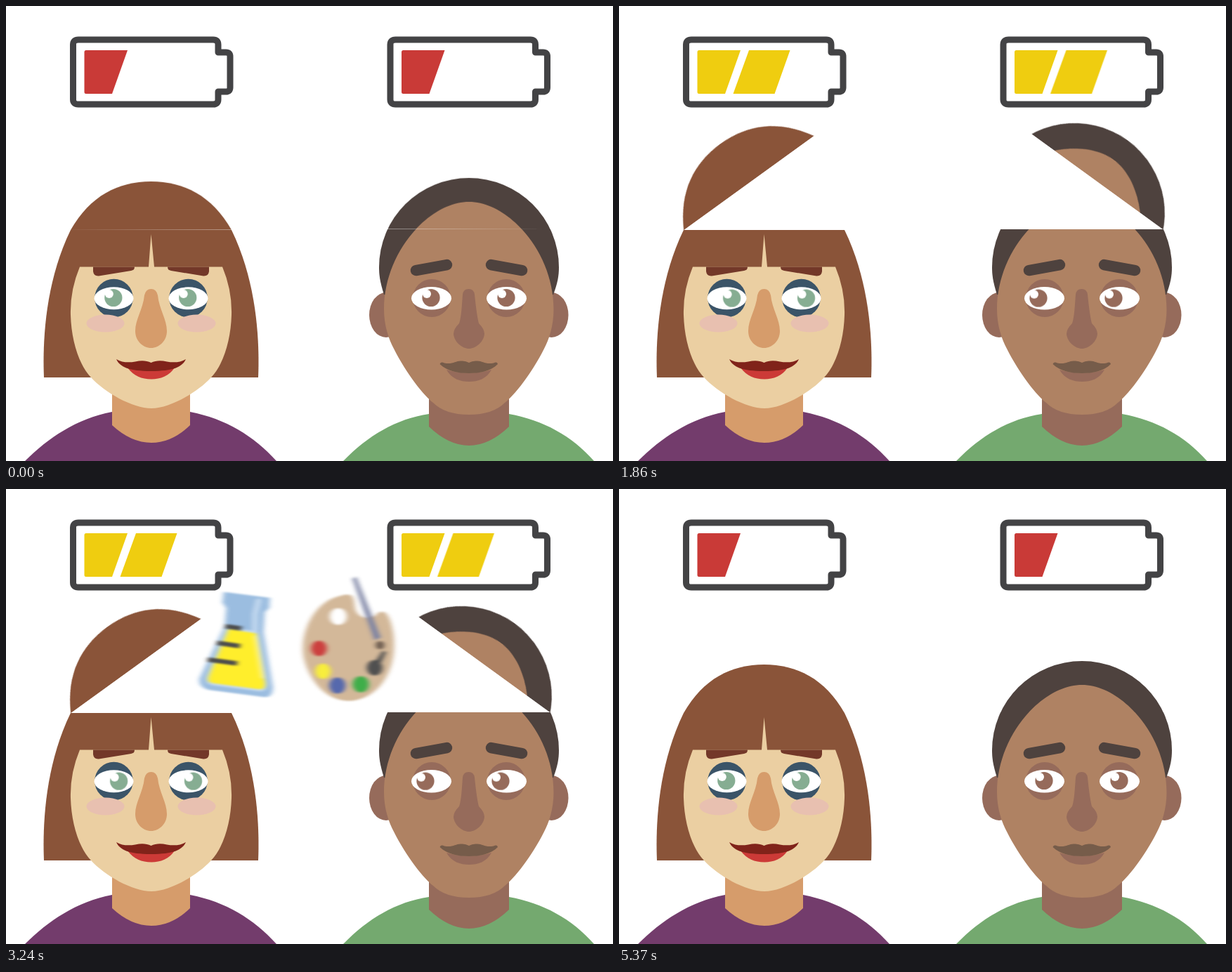
An HTML page for the animation above (5970 ms loop, 864 px wide and 648 px high).

```html
<!DOCTYPE html>
<html lang="en">
<head>
<meta charset="utf-8">
<title>Sharing ideas</title>
<style>
html, body { margin: 0; width: 100%; height: 100%; overflow: hidden; background: #fff; }
svg { display: block; width: 100vw; height: 100vh; }

.cap, .gaze, .charge, .c2, .c3, .x, .y, .spin { animation: 5970ms linear infinite both; }

/* heads and eyes */
.cap { animation-name: open; transform-origin: var(--hinge); }
.gaze { animation-name: look; }
.her { --hinge: 92.5px 319px; --tilt: -35.9deg; --look: 7.8px; }
.him { --hinge: 774px 318px; --tilt: 36deg; --look: -8px; }
@keyframes open {
  0% { transform: rotate(0deg); animation-timing-function: cubic-bezier(.17,.17,.67,1); }
  11.558% { transform: rotate(var(--tilt)); }
  61.307% { transform: rotate(var(--tilt)); animation-timing-function: cubic-bezier(.33,0,.8,.87); }
  73.869%, 100% { transform: rotate(0deg); }
}
@keyframes look {
  0% { transform: translate(0, 0); animation-timing-function: cubic-bezier(.17,.17,.67,1); }
  11.558% { transform: translate(var(--look), .6px); }
  61.307% { transform: translate(var(--look), .6px); animation-timing-function: cubic-bezier(.33,0,.8,.87); }
  73.869%, 100% { transform: translate(0, 0); }
}

/* batteries */
.charge, .c2, .c3 { animation-timing-function: step-end; }
.charge { animation-name: charge; }
.c2 { animation-name: second; }
.c3 { animation-name: third; }
@keyframes charge {
  0% { fill: #c93a37; }
  31.156% { fill: #efcd10; }
  61.307% { fill: #34ad3a; }
  80.905% { fill: #efcd10; }
  89.95%, 100% { fill: #c93a37; }
}
@keyframes second {
  0% { opacity: 0; }
  31.156% { opacity: 1; }
  89.95%, 100% { opacity: 0; }
}
@keyframes third {
  0% { opacity: 0; }
  61.307% { opacity: 1; }
  80.905%, 100% { opacity: 0; }
}

/* ideas: steady sideways, parabolic up and down, slow turn */
.x, .y, .spin { animation-delay: var(--at); }
.x { animation-name: var(--path); }
.y { animation-name: arc; filter: url(#smear); }
.spin { animation-name: turn; }
.left { --path: toLeft; --top: 198px; --low: 425px; --turn: 20deg; }
.right { --path: toRight; --top: 200px; --low: 460px; --turn: -20deg; }
@keyframes toLeft {
  0% { transform: translateX(712px); }
  19.095%, 100% { transform: translateX(152px); }
}
@keyframes toRight {
  0% { transform: translateX(147px); }
  9.548% { transform: translateX(410px); }
  19.095%, 100% { transform: translateX(700px); }
}
@keyframes arc {
  0% { transform: translateY(var(--low)); animation-timing-function: cubic-bezier(.333,.667,.667,1); }
  9.548% { transform: translateY(var(--top)); animation-timing-function: cubic-bezier(.333,0,.667,.333); }
  19.095%, 100% { transform: translateY(var(--low)); }
}
@keyframes turn {
  0% { transform: rotate(calc(-1 * var(--turn))); }
  19.095%, 100% { transform: rotate(var(--turn)); }
}
</style>
</head>
<body>
<svg viewBox="0 0 864 648">
  <defs>
    <filter id="smear" x="-20%" y="-20%" width="140%" height="140%" color-interpolation-filters="sRGB">
      <feGaussianBlur stdDeviation="3.6 .9"/>
    </filter>
    <clipPath id="air"><rect width="864" height="318"/></clipPath>
    <clipPath id="herTop"><rect width="432" height="319"/></clipPath>
    <clipPath id="herLow"><rect y="319" width="432" height="329"/></clipPath>
    <clipPath id="himTop"><rect x="432" width="432" height="318"/></clipPath>
    <clipPath id="himLow"><rect x="432" y="318" width="432" height="330"/></clipPath>

    <path id="case" fill="none" stroke="#434345" stroke-width="9" stroke-linejoin="round"
      d="M103 48H295Q302 48 302 55V66H313Q319 66 319 72V116Q319 122 313 122H302V133Q302 140 295 140H103Q95.5 140 95.5 133V55Q95.5 48 103 48Z"/>
    <path id="cell1" d="M114 63H173L151 125H114Q111.500 125 111.500 122.500V65.500Q111.500 63 114 63Z"/>
    <path id="cell2" d="M185 63H243.500L221.500 125H162.500Z"/>
    <path id="cell3" d="M255.500 63H286Q288 63 288 65V81H302Q304 81 304 83V105.500Q304 107.500 302 107.500H288V123Q288 125 286 125H233Z"/>

    <path id="hair" fill="#8a5439"
      d="M54 529C52 480 55 395 92 319C120 270 160 250 206.500 250C253 250 293 270 321 319C358 395 361 480 359 529Z"/>
    <g id="himHead">
      <path fill="#4e423e" d="M538 411C532 392 531 382 531 372A128 127 0 0 1 787 372C787 385 785 395 779 411Z"/>
      <path fill="#af8263" d="M659 279C603 279 538 350 538 432C538 455 545 475 552 488C570 524 595 555 608 565Q625 582 659 582Q693 582 710 565C723 555 748 524 766 488C773 475 779.500 455 779.500 432C779.500 350 715 279 659 279Z"/>
    </g>
    <g id="herSide">
      <path fill="#733829" d="M124 371.500V378Q125 385 132 384.500L178 377Q183 376 183 371.500Z"/>
      <circle cx="153.500" cy="416" r="27.300" fill="#3b5468"/>
      <ellipse cx="153.500" cy="416.300" rx="28" ry="16" fill="#fff"/>
      <ellipse cx="141.500" cy="452" rx="27" ry="12.500" fill="#e8c0b0"/>
    </g>
    <g id="himSide">
      <path stroke="#4e423e" stroke-width="15.500" stroke-linecap="round" d="M583.500 376.500L627.500 368.500"/>
      <circle cx="606" cy="416" r="27" fill="#966b5b"/>
      <ellipse cx="605.500" cy="416.300" rx="28.500" ry="16.300" fill="#fff"/>
    </g>
    <g id="iris">
      <circle r="12.600"/>
      <circle cx="-6" cy="-5.500" r="6" fill="#fff"/>
    </g>
  </defs>

  <rect width="864" height="648" fill="#fff"/>

  <!-- batteries -->
  <g>
    <use href="#case"/>
    <g class="charge"><use href="#cell1"/><use href="#cell2" class="c2"/><use href="#cell3" class="c3"/></g>
  </g>
  <g transform="translate(451.500 0)">
    <use href="#case"/>
    <g class="charge"><use href="#cell1"/><use href="#cell2" class="c2"/><use href="#cell3" class="c3"/></g>
  </g>

  <!-- woman -->
  <g class="her">
    <path fill="#733c6c" d="M27 648C60 615 100 588 151 578H262C313 588 352 612 385 648Z"/>
    <path fill="#d69c6b" d="M151 540V597Q178 622 207 622Q236 622 262 597V540Z"/>
    <g clip-path="url(#herLow)"><use href="#hair"/></g>
    <path fill="#ebcfa2" d="M105 371.500Q91 405 92 440C93 475 103 510 121 529C140 550 180 573 207 573C233 573 273 550 292 529C310 510 320 475 321 440Q322 405 308 371.500H211L206.500 325L203 371.500Z"/>
    <use href="#herSide"/>
    <use href="#herSide" transform="matrix(-1 0 0 1 413 0)"/>
    <g class="gaze" fill="#86ad92">
      <use href="#iris" x="152.800" y="415.500"/>
      <use href="#iris" x="258.700" y="415.500"/>
    </g>
    <path fill="#d69c6b" d="M197 412Q199 403 206.500 403Q214 403 216 412C218 432 229 446 229 463C229 477 218 487 206.500 487C195 487 184 477 184 463C184 446 195 432 197 412Z"/>
    <path fill="#cc3a37" d="M173 515C190 520 223 520 240 515C232 527 220 531.500 207 531.500C193 531.500 182 527 173 515Z"/>
    <path fill="#80231a" d="M157 503C165 508 175 508 184 506.500C193 504.500 200 505 206.500 508C213 505 220 504.500 229 506.500C238 508 248 508 256 503C251 514 238 520 206.500 520C175 520 162 514 157 503Z"/>
    <g class="cap"><g clip-path="url(#herTop)"><use href="#hair"/></g></g>
  </g>

  <!-- man -->
  <g class="him">
    <path fill="#74a96f" d="M480 648C515 612 555 588 602 581H716C765 590 805 612 837 648Z"/>
    <path fill="#966b5b" d="M602 550V599Q630 626 659 626Q688 626 716 599V550Z"/>
    <g fill="#966b5b">
      <ellipse cx="541" cy="440" rx="24" ry="32"/>
      <ellipse cx="776.500" cy="440" rx="24" ry="32"/>
    </g>
    <g clip-path="url(#himLow)"><use href="#himHead"/></g>
    <use href="#himSide"/>
    <use href="#himSide" transform="matrix(-1 0 0 1 1318 0)"/>
    <g class="gaze" fill="#966b5b">
      <use href="#iris" x="605" y="415.500"/>
      <use href="#iris" x="712" y="415.500"/>
    </g>
    <path fill="#966b5b" d="M650 411Q651 403 658.500 403Q666 403 667 411C669 430 671 445 673 452Q681 460 681 467C680 479 668 488 659 488C650 488 638 479 637 467Q637 460 645 452C648 445 649 425 650 411Z"/>
    <path fill="#966b5b" d="M627 518C645 524 673 524 691 518C684 531 672 535 659 535C647 535 634 531 627 518Z"/>
    <path fill="#765c4a" d="M617.500 510Q619 506 624 508.500C636 511 640 505 648 505.500Q654 505 659 508Q664 505 670 505.500C678 505 682 511 694 508.500Q699 506 700 510C690 520 675 523 659 523C643 523 628 520 617.500 510Z"/>
    <g class="cap"><g clip-path="url(#himTop)"><use href="#himHead"/></g></g>
  </g>

  <!-- ideas in flight -->
  <g clip-path="url(#air)">
    <g class="right" style="--at: 720ms"><g class="x"><g class="y"><g class="spin">
      <g transform="rotate(-2.100) translate(-382 -203)">
        <path fill="#954b46" d="M310 191Q312 180 322 178L445 147L490 207L486 227L356 262Z"/>
        <path fill="#efe0b5" d="M322 180L364 240L359 256L316 194Q316 184 322 180Z"/>
        <path fill="#cbb88a" d="M364 240L482 208L480 223L359 256Z"/>
        <path fill="#954b46" d="M322 178L445 147L486 206L364 240Z"/>
        <path fill="#b98080" d="M411 177L440 168L460 195L430 204Z"/>
      </g>
    </g></g></g></g>

    <g class="left" style="--at: 676ms"><g class="x"><g class="y"><g class="spin">
      <g transform="rotate(.6) translate(-440 -198)" fill="#505050">
        <path d="M387 160L472 128L476 153L391 183Z"/>
        <path d="M387 160L395 159L413 252L405 254ZM465 131L472 128L492 220L484 224Z"/>
        <ellipse cx="394" cy="257" rx="20" ry="19"/>
        <ellipse cx="469.500" cy="226" rx="20" ry="19"/>
      </g>
    </g></g></g></g>

    <g class="right" style="--at: 2505ms"><g class="x"><g class="y"><g class="spin">
      <g transform="rotate(-5.800) translate(-334 -222)">
        <path fill="#d3b899" d="M326 150C350 147 348 155 347 170C346 185 365 195 376 185C390 178 394 195 393 217C390 265 360 300 320 300C285 298 262 265 261 225C262 190 290 152 326 150Z"/>
        <circle cx="321" cy="178" r="12" fill="#fff"/>
        <circle cx="285" cy="217" r="11" fill="#cc403f"/>
        <circle cx="284" cy="250" r="11" fill="#f8ee3d"/>
        <circle cx="300" cy="274" r="11.500" fill="#5669ad"/>
        <circle cx="333" cy="279" r="11.500" fill="#3fae49"/>
        <circle cx="357" cy="260" r="11" fill="#505050"/>
        <path fill="#505050" d="M374 238L377 242L362 262L355 256Z"/>
        <circle cx="371" cy="230" r="6" fill="#6e5d50"/>
        <path fill="#7b82a3" d="M352 130L357 127L374 219L365 222Z"/>
      </g>
    </g></g></g></g>

    <g class="left" style="--at: 2482ms"><g class="x"><g class="y"><g class="spin">
      <g transform="rotate(5) translate(-502 -212)" fill="none" stroke-linecap="round">
        <path fill="#9bbde0" d="M458 143L524 138L526 152L521 160L525 188L554 262Q556 276 546 278L465 284Q449 283 449 270L469 190L466 165L459 158Z"/>
        <path stroke="#c5daf0" stroke-width="8" d="M509 146L508 165L512 186"/>
        <path fill="#ffee2c" stroke="#c5daf0" stroke-width="3" d="M474 192L516 190L543 258Q546 268 537 270L469 275Q458 275 460 264Z"/>
        <path stroke="#fff37a" stroke-width="6" d="M515 197L536 250"/>
        <path stroke="#4d4d4d" stroke-width="6.500" stroke-linecap="butt" d="M470 190.500L493 189M463 216L496 214M455 242L497 239"/>
      </g>
    </g></g></g></g>
  </g>
</svg>
</body>
</html>
```
